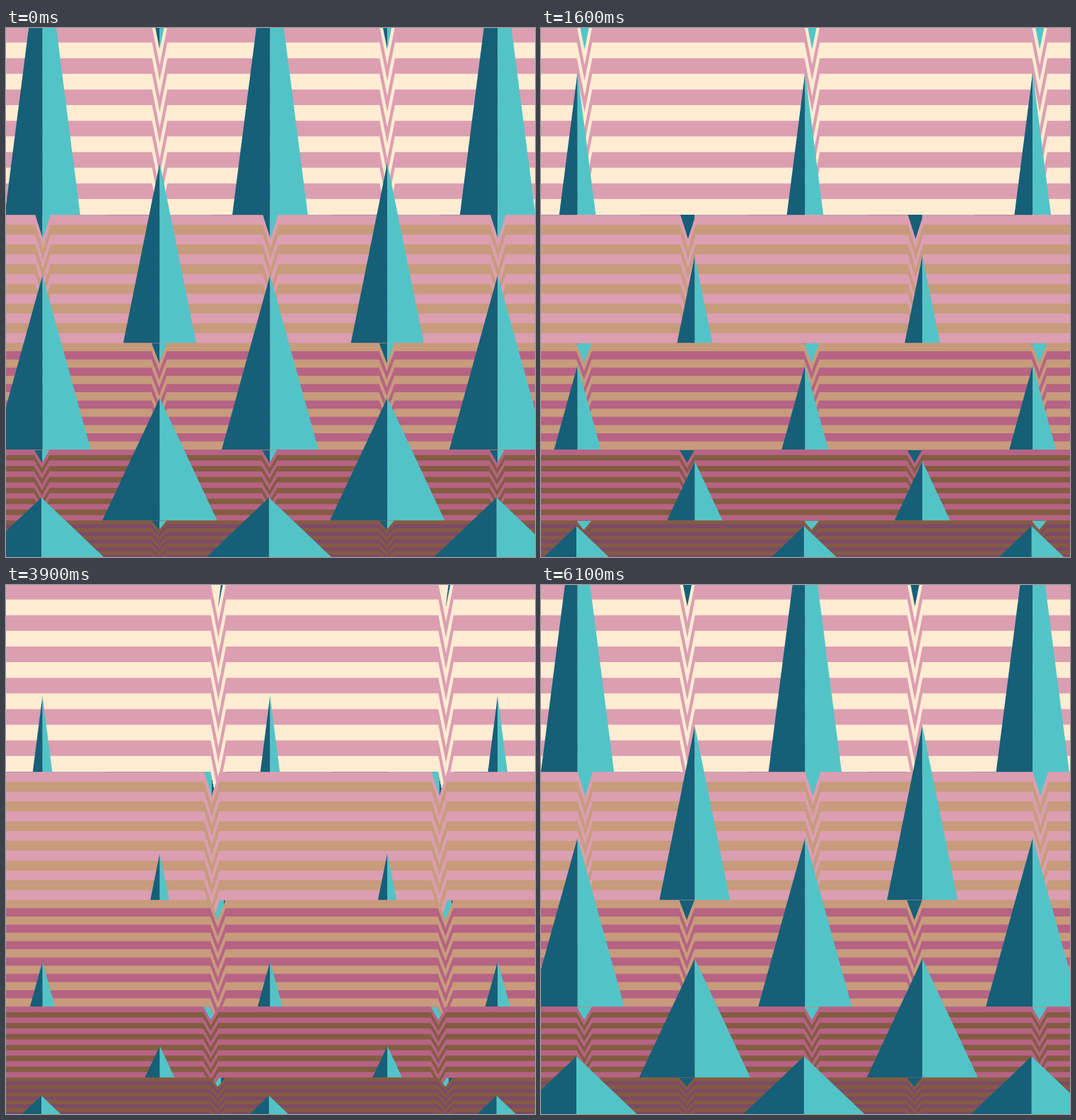
These frames come from a looping animation (748x748 px, 6.2 s). An HTML page with a canvas:

```html
<!DOCTYPE html>
<html lang="en">
<head>
<meta charset="utf-8">
<title>Triangle forest</title>
<style>
  html, body { margin: 0; width: 100%; height: 100%; overflow: hidden; background: #ffecd2; }
  canvas { display: block; width: 100vw; height: 100vh; }
</style>
</head>
<body>
<canvas id="stage" width="748" height="748"></canvas>
<script>
const ctx = document.getElementById('stage').getContext('2d');
const SIZE = 748;
const PERIOD = 321.8;
const STEPS = 62;
const STEP_MS = 100;
const STRIPES = 13;
const NOTCH = 10.8;
const DARK = '#165f78', LIGHT = '#52c4c7';
const CREAM = '#ffecd2', PINK = '#dc9eb1', TAN = '#c79b7c';
const ROSE = '#b66384', BROWN = '#835c41', PLUM = '#7d4a67';

// notch: start x of the cut; dir: its travel; seam: where the hidden light side meets the next dark one
// tree: x, base y, height and half width at full size, lift at rest
const rows = [
  { top: -23.7, end: 263.9, colors: [CREAM, PINK], notch: 217.3, dir: 1, seam: 296,
    tree: { x: 51.6, base: 264.2, h: 416, w: 53.4 } },
  { top: 264.3, end: 445.5, colors: [PINK, TAN], notch: 52.2, dir: -1, seam: 291,
    tree: { x: 217.4, base: 445.4, h: 255, w: 51.6 } },
  { top: 445.5, end: 596.2, colors: [TAN, ROSE], notch: 216.6, dir: 1, seam: 308,
    tree: { x: 51.6, base: 596.2, h: 246.5, w: 68.4 } },
  { top: 596.2, end: 696.4, colors: [ROSE, BROWN], notch: 50.8, dir: -1, seam: 300,
    tree: { x: 217.4, base: 696.4, h: 173.5, w: 81.2 } },
  { top: 696.4, end: 766.4, colors: [BROWN, PLUM], notch: 216.4, dir: 1, seam: 304,
    tree: { x: 50, base: 742.3, h: 78.4, w: 82.2, sink: 24 } }
];

const wrap = x => ((x % PERIOD) + PERIOD) % PERIOD;

function fill(color, points) {
  ctx.fillStyle = color;
  ctx.beginPath();
  points.forEach(([x, y]) => ctx.lineTo(x, y));
  ctx.fill();
}

function tiled(x, draw) {
  for (let cx = wrap(x) - PERIOD; cx < SIZE + PERIOD; cx += PERIOD) draw(cx);
}

// A horizontal line with a V at every notch
function edge(y, x, depth) {
  const line = [[-2 * PERIOD, y]];
  tiled(x, cx => line.push([cx - NOTCH, y], [cx, y + depth], [cx + NOTCH, y]));
  line.push([SIZE + 2 * PERIOD, y]);
  return line;
}

function drawHidden(row) {
  const depth = (row.end - row.top) * 0.1875;
  const cuts = [140.2, 217.4, row.seam, 373.4, 462];
  for (let i = 0; i < 4; i++) {
    ctx.fillStyle = i % 2 ? LIGHT : DARK;
    tiled(cuts[i], x => ctx.fillRect(x, row.top - 1, cuts[i + 1] - cuts[i], depth + 2));
  }
}

function drawBand(row, step) {
  const height = row.end - row.top;
  const depth = height * 0.1875;
  const x = row.notch + row.dir * step * 2 * PERIOD / STEPS;
  const bottom = edge(row.end, x, depth).reverse();
  for (let i = 0; i < STRIPES; i++) {
    const y = row.top + height * i / STRIPES;
    fill(row.colors[i % 2], edge(y, x, depth).concat(bottom));
  }
}

function drawTrees({ x, base, h, w, sink = 0 }, scale) {
  const top = base - h * scale;
  const foot = base + sink;
  const half = (foot - top) * w / h;
  if (half <= 0) return;
  tiled(x, cx => {
    fill(DARK, [[cx, top], [cx + 0.3, foot], [cx - half, foot]]);
    fill(LIGHT, [[cx, top], [cx + half, foot], [cx, foot]]);
  });
}

function draw(step) {
  ctx.fillStyle = CREAM;
  ctx.fillRect(0, 0, SIZE, SIZE);
  rows.forEach(drawHidden);

  // Tips hanging in from the band above the stage
  tiled(379 - step * 2 * PERIOD / STEPS, cx =>
    fill(CREAM, [[cx - NOTCH, -23.7], [cx + NOTCH, -23.7], [cx, 62]]));

  const scale = Math.abs(1 - step / (STEPS / 2));
  for (const row of rows) {
    drawBand(row, step);
    drawTrees(row.tree, scale);
  }
}

const start = performance.now();
let shown = -1;
function tick() {
  const step = Math.floor((performance.now() - start) / STEP_MS) % STEPS;
  if (step !== shown) draw(shown = step);
  requestAnimationFrame(tick);
}
tick();
</script>
</body>
</html>
```
